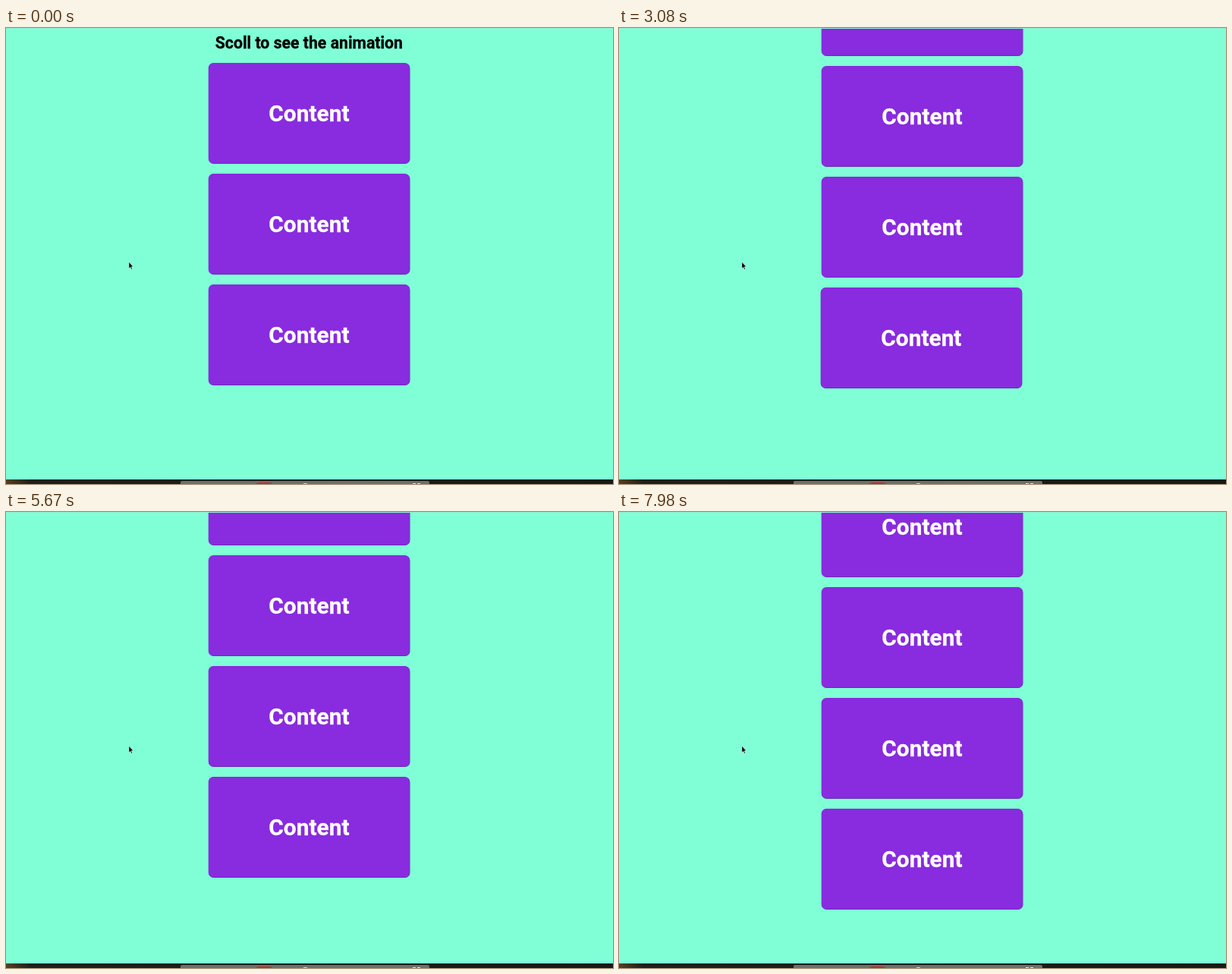
Recreate the animation shown at these times as an HTML page. Size 800 by 601 pixels, loop 8 s.

```html
<!DOCTYPE html>
<html lang="en">
<head>
<meta charset="utf-8">
<title>Scroll animation</title>
<style>
  html, body { margin: 0; width: 100%; height: 100%; overflow: hidden; background: #80ffd6; }
  svg { display: block; width: 100%; height: 100%; }
  text { font-family: Roboto, Arial, sans-serif; font-weight: 700; text-anchor: middle; stroke-width: .3; }
</style>
</head>
<body>
<svg viewBox="0 0 800 601">
  <defs>
    <linearGradient id="strip">
      <stop offset="0" stop-color="#54401f"/>
      <stop offset=".04" stop-color="#1c2018"/>
      <stop offset="1" stop-color="#141b14"/>
    </linearGradient>
  </defs>
  <rect width="800" height="601" fill="#80ffd6"/>
  <g id="page">
    <text x="399.4" y="27.4" font-size="21.24" stroke="#000">Scoll to see the animation</text>
  </g>
  <rect width="800" height="1" fill="#8eeed2"/>
  <g id="dock">
    <rect y="595" width="800" height="6" fill="url(#strip)"/>
    <path d="M230 601V599Q230 597 232 597H556Q558 597 558 599V601Z" fill="#6c706a"/>
    <path d="M329 601Q331 599 335 599H346Q350 599 352 601Z" fill="#c8262b"/>
    <rect x="392" y="600" width="5" height="1" fill="#c9d6d0"/>
    <path d="M536 600.5h4m2 0h4" stroke="#dfe5e2"/>
  </g>
  <path d="M162 308.5V317l1.9-1.7 1.3 3 1.2-.5-1.3-3 2.4-.2Z" fill="#000" stroke="#fff" stroke-width=".4"/>
</svg>
<script>
const NS = 'http://www.w3.org/2000/svg';
const LOOP = 8000, STEP = 70, SLIDE = 400;
const COUNT = 8, TRIGGER = 476;
const CENTER = 399.4;
const BOX = { y: 46, w: 265.3, h: 132.6, pitch: 146 };

// Swipes on the trackpad
const FLICKS = [
  { start: 1560, length: 635, px: 74 },
  { start: 2366, length: 821, px: 224.5 },
  { start: 3673.6, length: 583, px: 410 },
  { start: 5000, length: 600, px: -135.5 },
  { start: 6160, length: 700, px: -164 },
  { start: 7210, length: 770, px: -316 }
];

const clamp = x => Math.min(1, Math.max(0, x));
const smooth = u => u * u * (3 - 2 * u);
const scrollAt = t => FLICKS.reduce(
  (sum, f) => sum + f.px * smooth(clamp((t - f.start) / f.length)), 0);

// CSS "ease": cubic-bezier(.25, .1, .25, 1)
function ease(x) {
  if (x <= 0 || x >= 1) return clamp(x);
  const curve = (s, a, b) => 3 * (1 - s) * (1 - s) * s * a + 3 * (1 - s) * s * s * b + s * s * s;
  let lo = 0, hi = 1;
  for (let k = 0; k < 24; k++) {
    const mid = (lo + hi) / 2;
    if (curve(mid, .25, .25) < x) lo = mid; else hi = mid;
  }
  return curve(lo, .1, 1);
}

function add(parent, tag, attrs, text) {
  const el = document.createElementNS(NS, tag);
  for (const k in attrs) el.setAttribute(k, attrs[k]);
  if (text) el.textContent = text;
  return parent.appendChild(el);
}

// A box slides in when its top rises above the trigger line, and out when it sinks below
function findTimes(top) {
  const shown = t => top - scrollAt(t) < TRIGGER;
  let enter = 0, leave = LOOP;
  while (enter < LOOP && !shown(enter)) enter++;
  while (leave > enter && !shown(leave)) leave--;
  return {
    enter: enter === 0 ? -SLIDE : enter,
    leave: leave === LOOP ? Infinity : leave
  };
}

const page = document.getElementById('page');

function makeBox(_, i) {
  const g = add(page, 'g', {}), y = BOX.y + i * BOX.pitch, x = CENTER - BOX.w / 2;
  const card = { x, y, width: BOX.w, height: BOX.h, rx: 6.6 };
  add(g, 'rect', { ...card, x: x + .4, y: y + .4, fill: '#4d2c98' });
  add(g, 'rect', { ...card, fill: '#892bde' });
  add(g, 'text', { x: CENTER, y: y + 76.8, 'font-size': 29.86, fill: '#fff', stroke: '#fff' }, 'Content');
  return { g, side: i % 2 ? 1 : -1, ...findTimes(y) };
}

const boxes = Array.from({ length: COUNT }, makeBox);

function draw(t) {
  page.setAttribute('transform', `translate(0 ${-Math.round(scrollAt(t))})`);
  for (const { g, side, enter, leave } of boxes) {
    const away = t < leave ? 1 - ease((t - enter) / SLIDE) : ease((t - leave) / SLIDE);
    g.setAttribute('transform', `translate(${side * away * 4 * BOX.w} 0)`);
  }
}

const begin = performance.now();
function tick() {
  const t = (performance.now() - begin) % LOOP;
  draw(Math.floor(t / STEP) * STEP);
  requestAnimationFrame(tick);
}
tick();
</script>
</body>
</html>
```
